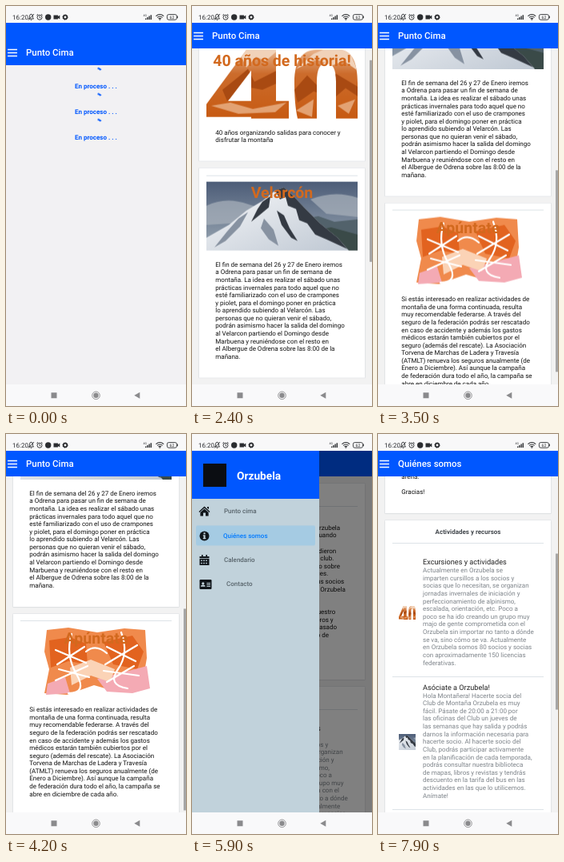
Animation of 225x500 px, one loop 8000 ms. Source, as an HTML page:

```html
<!DOCTYPE html>
<html lang="es">
<head>
<meta charset="utf-8">
<title>Club de montaña</title>
<style>
@property --home { syntax: "<number>"; inherits: true; initial-value: 0; }
@property --about { syntax: "<number>"; inherits: true; initial-value: 0; }

* { box-sizing: border-box; margin: 0; padding: 0; }
html, body { width: 225px; height: 500px; overflow: hidden; }
body { font: 8px/9.58px Roboto, sans-serif; text-rendering: geometricPrecision; }
svg { display: block; }
.stage, .stage div, .stage .abs { position: absolute; }
.stage {
  width: 225px; height: 500px; overflow: hidden; background: #f2f1f3;
  animation: home 8s linear infinite, about 8s linear infinite;
}
.stage, .stage * { animation-iteration-count: infinite; }

/* System bars */
.status { left: 0; top: 0; width: 225px; height: 21px; background: #f8f8f9; }
.nav { left: 0; top: 473px; width: 225px; height: 27px; background: #f9f9fa; }

/* App header */
.header {
  left: 0; top: 21px; width: 225px; height: 32px; background: #0057ff; color: #fff;
  animation: header 8s step-end infinite;
}
.bar { left: 0; bottom: 0; width: 225px; height: 32px; }
.bar svg { position: absolute; left: 2px; top: 11px; }
.bar b { position: absolute; left: 25px; top: 9px; font: 500 11.46px/14px Roboto, sans-serif; white-space: pre; }

/* Pages */
.view { left: 0; top: 53px; width: 225px; height: 420px; overflow: hidden; background: #f2f2f2; }
.list { left: 0; top: 0; width: 225px; display: flow-root; }
#home { animation: first 8s step-end infinite; }
#home .list { transform: translateY(calc(var(--home) * -1px)); }
#about { visibility: hidden; }
#about, .second { animation: second 8s step-end infinite; }
.first { animation: first 8s step-end infinite; }
#about .list { transform: translateY(calc(var(--about) * -1px)); }
.thumb { left: 222px; top: 0; width: 2.5px; background: #a6a6a6; animation: thumb 8s linear infinite; }
#home .thumb { height: 252px; transform: translateY(calc(var(--home) * .606px)); }
#about .thumb { height: 195px; transform: translateY(calc(var(--about) * .464px)); }

.card {
  position: relative; margin: 9px 9px 0; padding: 8.5px 9px 21.3px; background: #fff;
  box-shadow: 0 0 0 .6px #dfe3e7, 0 .8px 1.5px #0003;
}
hr { border: 0; height: .7px; background: #dde3e8; }
.card p { margin: 12.7px 0 0 11.3px; white-space: pre; color: #111; }
.stage .pic { position: relative; height: 86px; margin-top: 7.8px; }
.pic svg { animation: load 8s linear infinite; }
h2 {
  position: absolute; left: 0; top: 2px; width: 100%; text-align: center; white-space: nowrap;
  font: 700 19.5px/24px Roboto, sans-serif; color: #d2691e;
}
h3 { font: 700 8px/13px Roboto, sans-serif; text-align: center; color: #43484d; margin-bottom: 6.5px; }
#about p { margin-top: 22.2px; }
#about .card + .card { height: 640px; }
.item { left: 47px; white-space: pre; color: #7d8389; line-height: 9.63px; }
.item b { display: block; font: 400 9.17px/11px Roboto, sans-serif; color: #222; }

/* Loading */
.loading { left: 0; top: 74px; width: 225px; height: 399px; background: #f2f1f3; color: #0057ff; animation: loading 8s step-end infinite; }
.wait { left: 0; width: 225px; height: 32px; text-align: center; font-weight: 700; padding-top: 22px; }
.wait svg { position: absolute; left: 102.5px; top: 1px; animation: spin 1.33333s linear infinite; }
.wait circle { animation: arc 1.33333s ease-in-out infinite; }

/* Drawer */
.shade { left: 0; top: 21px; width: 225px; height: 452px; background: #000; opacity: 0; animation: shade 8s linear infinite; }
.drawer {
  left: 0; top: 21px; width: 159px; height: 452px; background: #c1d2db;
  transform: translateX(-160px); animation: drawer 8s linear infinite;
}
.brand { width: 159px; height: 60px; background: #0057ff; }
.brand i { position: absolute; left: 14px; top: 16px; width: 29px; height: 29px; background: #0b0d12; }
.brand b { position: absolute; left: 56px; top: 23px; font: 700 13.7px/18px Roboto, sans-serif; color: #fff; }
.active { left: 5px; top: 63px; width: 149px; height: 25px; border-radius: 2px; background: #a5cbe3; animation: pick 8s step-end infinite; }
.entry { height: 10px; font-weight: 500; color: #58646b; }
.entry:nth-of-type(3) { animation: off 8s step-end infinite; }
.entry:nth-of-type(4) { animation: on 8s step-end infinite; }

@keyframes home {
  0%, 26.25% { --home: 0; } 27.5% { --home: 4; } 30% { --home: 24; } 32.5% { --home: 98; }
  35%, 36.25% { --home: 156; } 37.5% { --home: 161; } 38.75% { --home: 177; }
  42.5% { --home: 243; } 46.25% { --home: 268; } 48.75%, 100% { --home: 273; }
}
@keyframes about {
  0%, 87.5% { --about: 0; } 88.75% { --about: 7; } 91.25% { --about: 58; } 93.75% { --about: 124; }
  96.25% { --about: 177; } 98.75%, 100% { --about: 208; }
}
@keyframes header { 0% { height: 53px; } 6.25%, 100% { height: 32px; } }
@keyframes loading { 0% { visibility: visible; } 6.25%, 100% { visibility: hidden; } }
@keyframes load { 0%, 8% { opacity: 0; } 12%, 100% { opacity: 1; } }
@keyframes first { 0% { visibility: visible; } 73.75%, 100% { visibility: hidden; } }
@keyframes second { 0% { visibility: hidden; } 73.75%, 100% { visibility: visible; } }
@keyframes thumb { 0%, 26.25% { opacity: 0; } 27.5%, 54% { opacity: 1; } 58%, 87.5% { opacity: 0; } 88.5%, 100% { opacity: 1; } }
@keyframes shade { 0%, 55% { opacity: 0; } 60%, 73.75% { opacity: .5; } 80%, 100% { opacity: 0; } }
@keyframes drawer {
  0% { transform: translateX(-160px); }
  55% { transform: translateX(-160px); animation-timing-function: ease-out; }
  60% { transform: none; }
  73.75% { transform: none; animation-timing-function: ease-in-out; }
  80%, 100% { transform: translateX(-160px); }
}
@keyframes pick { 0% { transform: none; } 72.5%, 100% { transform: translateY(30.4px); } }
@keyframes off { 0% { color: #007aff; } 72.5%, 100% { color: #58646b; } }
@keyframes on { 0% { color: #58646b; } 72.5%, 100% { color: #007aff; } }
@keyframes spin { from { transform: rotate(-78deg); } to { transform: rotate(282deg); } }
@keyframes arc { 0%, 100% { stroke-dasharray: 4.6 60; } 50% { stroke-dasharray: 32 60; } }
</style>
</head>
<body>
<svg width="0" height="0" style="position:absolute">
  <defs>
    <clipPath id="digits">
      <path clip-rule="evenodd" d="M50 0H87V64H103V86H56V84H0V68ZM56 26L27 64H56ZM110 40C110 14 120 0 137 0H166C182 0 189 16 189 42V86H162V40C162 24 158 17 150 17S138 24 138 40V86H114C111 72 110 58 110 40Z"/>
    </clipPath>
    <linearGradient id="amber" x2="0" y2="1">
      <stop stop-color="#e9b48c"/><stop offset=".35" stop-color="#cc6c2c"/><stop offset="1" stop-color="#c75a12"/>
    </linearGradient>
    <linearGradient id="sky" x2="0" y2="1">
      <stop stop-color="#4d5d78"/><stop offset="1" stop-color="#9ba8b4"/>
    </linearGradient>
    <linearGradient id="snow" x2="1" y2="1">
      <stop stop-color="#f7f8fa"/><stop offset="1" stop-color="#bfc8d3"/>
    </linearGradient>
  </defs>
  <symbol id="forty" viewBox="0 0 189 86" preserveAspectRatio="none">
    <g clip-path="url(#digits)">
      <path fill="url(#amber)" d="M0 0H189V86H0Z"/>
      <path fill="#f1d2b9" d="M40 0H90L74 14L62 9L50 22ZM112 24L134 5L146 0H178L189 26L172 14L156 20L138 12Z"/>
      <path fill="#a94a12" d="M20 50L40 34L52 24L60 40L88 26V42L70 50L48 46L26 64ZM110 50L126 32L140 46L162 30L189 46V58L174 48L160 60L134 52L114 66Z"/>
      <path fill="#e3a273" d="M6 70L30 66L58 74L100 66L86 78L40 80ZM112 76L134 62L132 84ZM164 70L186 62L178 80Z"/>
    </g>
  </symbol>
  <symbol id="peak" viewBox="0 0 189 86">
    <path fill="url(#sky)" d="M0 0H189V86H0Z"/>
    <path fill="#aab3bd" d="M0 30Q24 18 52 28T104 26L60 50L0 54ZM130 22Q160 10 189 20V44L150 40Z" opacity=".7"/>
    <path fill="#52626b" d="M110 48L140 43L160 50L189 47V86H100Z"/>
    <path fill="#3a4a48" d="M128 62L156 57L189 66V86H120Z"/>
    <path fill="url(#snow)" d="M0 70L28 54L50 36L70 24L86 11L97 7L108 17L122 32L142 52L164 70L178 86H0Z"/>
    <path fill="#343a43" d="M86 11L97 7L108 17L122 32L142 52L164 70L176 84L150 72L136 66L126 52L116 48L112 34L102 30L99 19L92 22ZM70 25L80 18L78 32L66 42L56 50L64 34ZM88 36L97 42L104 58L114 74L106 70L94 54Z"/>
    <path fill="#8792a1" d="M40 46L52 38L42 56L24 74L10 82L26 62ZM72 46L84 60L90 80L78 72L68 58Z"/>
  </symbol>
  <symbol id="boots" viewBox="0 0 189 86">
    <path fill="#f08a4c" d="M33 3L60 0L96 6L130 1L156 3L158 38L152 74L120 80L92 72L58 84L30 82L36 52L30 30Z"/>
    <path fill="#e2631f" d="M36 16L62 12L82 20L84 46L60 42L38 50ZM104 18L140 10L154 30L146 52L116 46Z"/>
    <path fill="#f4aab4" d="M96 64L128 56L158 48L162 76L140 82L108 80ZM34 70L56 62L62 82L32 84Z"/>
    <path fill="#fbd3b6" d="M62 50L88 40L118 52L112 68L88 60L64 72Z"/>
    <path fill="none" stroke="#fff" stroke-width="2.2" stroke-linecap="round" d="M44 28L82 44M80 24L46 46M48 52L86 62M84 48L44 66M108 24L144 42M146 22L106 46M104 54L148 60M142 48L108 68M64 8Q56 34 70 58T60 82M126 6Q136 32 122 52T134 76M82 30Q94 20 108 32"/>
  </symbol>
  <symbol id="ring" viewBox="0 0 20 20">
    <circle cx="10" cy="10" r="7.5" fill="none" stroke="#0057ff" stroke-width="2"/>
  </symbol>
</svg>

<div class="stage">
  <div class="view" id="home">
    <div class="list">
      <article class="card"><hr>
        <div class="pic"><svg width="189" height="86"><use href="#forty"/></svg><h2>40 años de historia!</h2></div>
        <p>40 años organizando salidas para conocer y
disfrutar la montaña</p>
      </article>
      <article class="card"><hr>
        <div class="pic"><svg width="189" height="86"><use href="#peak"/></svg><h2>Velarcón</h2></div>
        <p>El fin de semana del 26 y 27 de Enero iremos
a Odrena para pasar un fin de semana de
montaña. La idea es realizar el sábado unas
prácticas invernales para todo aquel que no
esté familiarizado con el uso de crampones
y piolet, para el domingo poner en práctica
lo aprendido subiendo al Velarcón. Las
personas que no quieran venir el sábado,
podrán asimismo hacer la salida del domingo
al Velarcon partiendo el Domingo desde
Marbuena y reuniéndose con el resto en
el Albergue de Odrena sobre las 8:00 de la
mañana.</p>
      </article>
      <article class="card"><hr>
        <div class="pic"><svg width="189" height="86"><use href="#boots"/></svg><h2>Apúntate</h2></div>
        <p>Si estás interesado en realizar actividades de
montaña de una forma continuada, resulta
muy recomendable federarse. A través del
seguro de la federación podrás ser rescatado
en caso de accidente y además los gastos
médicos estarán también cubiertos por el
seguro (además del rescate). La Asociación
Torvena de Marchas de Ladera y Travesía
(ATMLT) renueva los seguros anualmente (de
Enero a Diciembre). Así aunque la campaña
de federación dura todo el año, la campaña se
abre en diciembre de cada año.</p>
      </article>
    </div>
    <div class="thumb"></div>
  </div>

  <div class="view" id="about">
    <div class="list">
      <article class="card"><h3>Un poquito de historia</h3><hr>
        <p>El nacimiento del club de montaña Orzubela
se remonta a la primavera de 1976 cuando
jóvenes aficionados a la montaña y
pertenecientes a un club juvenil decidieron
crear la sección montañera de dicho club.
Fueron unos comienzos duros debido sobre
todo a la situación política de entonces.
Gracias al esfuerzo económico de sus socios
y socias se logró alquilar una bajera. Orzubela
ya tenía su sede social.

Desde aquí queremos hacer llegar nuestro
agradecimiento a todos los montañeros y
montañeras que alguna vez habéis pasado
por el club aportando vuestro granito de
arena.

Gracias!</p>
      </article>
      <article class="card"><h3>Actividades y recursos</h3><hr>
        <svg class="abs" style="left:17px;top:107px" width="21" height="17"><use href="#forty"/></svg>
        <div class="item" style="top:47.5px"><b>Excursiones y actividades</b>Actualmente en Orzubela se
imparten cursillos a los socios y
socias que lo necesitan, se organizan
jornadas invernales de iniciación y
perfeccionamiento de alpinismo,
escalada, orientación, etc. Poco a
poco se ha ido creando un grupo muy
majo de gente comprometida con el
Orzubela sin importar no tanto a dónde
se va, sino cómo se va. Actualmente
en Orzubela somos 80 socios y socias
con aproximadamente 150 licencias
federativas.</div>
        <hr class="abs" style="left:9px;top:195px;width:189px">
        <svg class="abs" style="left:17px;top:267px" width="21" height="20" viewBox="52 0 90 86" preserveAspectRatio="none"><use href="#peak" width="189" height="86"/></svg>
        <div class="item" style="top:204px"><b>Asóciate a Orzubela!</b>Hola Montañera! Hacerte socia del
Club de Montaña Orzubela es muy
fácil. Pásate de 20:00 a 21:00 por
las oficinas del Club un jueves de
las semanas que hay salida y podrás
darnos la información necesaria para
hacerte socio. Al hacerte socio del
Club, podrás participar activamente
en la planificación de cada temporada,
podrás consultar nuestra biblioteca
de mapas, libros y revistas y tendrás
descuento en la tarifa del bus en las
actividades en las que lo utilicemos.
Anímate!</div>
        <hr class="abs" style="left:9px;top:361px;width:189px">
      </article>
    </div>
    <div class="thumb"></div>
  </div>

  <div class="loading">
    <div class="wait" style="top:0"><svg width="20" height="20"><circle cx="10" cy="10" r="7.5" fill="none" stroke="#0057ff" stroke-width="2"/></svg>En proceso . . .</div>
    <div class="wait" style="top:31.8px"><svg width="20" height="20"><circle cx="10" cy="10" r="7.5" fill="none" stroke="#0057ff" stroke-width="2"/></svg>En proceso . . .</div>
    <div class="wait" style="top:63.6px"><svg width="20" height="20"><circle cx="10" cy="10" r="7.5" fill="none" stroke="#0057ff" stroke-width="2"/></svg>En proceso . . .</div>
  </div>

  <div class="header">
    <div class="bar">
      <svg width="12" height="11"><path stroke="#fff" stroke-width="1.4" d="M0 1.5H12M0 5.5H12M0 9.5H12"/></svg>
      <b class="first">Punto Cima</b><b class="second">Quiénes somos</b>
    </div>
  </div>

  <div class="shade"></div>
  <nav class="drawer abs">
    <div class="brand"><i></i><b>Orzubela</b></div>
    <div class="active"></div>
    <div class="entry" style="left:40px;top:71px">Punto cima</div>
    <div class="entry" style="left:39px;top:101.5px">Quiénes somos</div>
    <div class="entry" style="left:40px;top:132px">Calendario</div>
    <div class="entry" style="left:43px;top:162px">Contacto</div>
    <svg class="abs" style="left:8px;top:68px" width="20" height="110" fill="#10151a">
      <path d="M7.5 1.5L14.5 8L13.6 9L7.5 3.6L1.4 9L.5 8ZM11 2H13V5L11 3.4ZM7.5 4.6L12.6 9V13.5H9V9.6H6V13.5H2.4V9Z"/>
      <circle cx="7.5" cy="38.5" r="6"/>
      <path fill="#c1d2db" d="M6.5 34.2H8.6V36.2H6.5ZM5.8 37.2H8.6V41H9.3V42.2H5.8V41H6.5V38.4H5.8Z"/>
      <path d="M1.5 64H4V62H5.6V64H9.4V62H11V64H13.5V66.2H1.5ZM1.5 67H13.5V75H1.5Z"/>
      <path stroke="#c1d2db" stroke-width="1.4" stroke-dasharray="1.6 1.4" d="M3.2 69.3H12M3.2 72.5H12"/>
      <rect x="1.5" y="93" width="15" height="12" rx="1.2"/>
      <path fill="#c1d2db" d="M3 101.8Q3 99.6 5.8 99.6T8.6 101.8ZM10.4 97H15V98H10.4ZM10.4 99H15V100H10.4ZM10.4 101H15V102H10.4Z"/>
      <circle cx="5.8" cy="97.8" r="1.6" fill="#c1d2db"/>
    </svg>
  </nav>

  <div class="status">
    <svg width="225" height="21" fill="#2b2d30">
      <text x="8" y="16.8" font-size="8" font-family="Roboto, sans-serif">16:20</text>
      <path fill="none" stroke="#2b2d30" stroke-width=".9" d="M28.5 16H34.5L33.5 14.5V12.5Q33.5 10.3 31.5 10.3T29.5 12.5V14.5ZM28 17.5L35 10M30.8 17.4H32.2"/>
      <g fill="none" stroke="#2b2d30" stroke-width=".9"><circle cx="42" cy="14.2" r="3"/><path d="M42 12.4V14.4L43.3 15M38.4 11.6L40 10.2M45.6 11.6L44 10.2"/></g>
      <circle cx="52.7" cy="14" r="3.7"/>
      <path d="M59.5 11.4H65V13L67.3 11.6V16.4L65 15V16.6H59.5Z"/>
      <circle cx="74" cy="14" r="2.3" fill="none" stroke="#2b2d30" stroke-width="1.7"/>
      <circle cx="74" cy="14" r="3.1" fill="none" stroke="#2b2d30" stroke-width="1" stroke-dasharray="1.2 1.23"/>
      <text x="171.5" y="13" font-size="3.6" font-family="Roboto, sans-serif">4G</text>
      <path d="M174 15.4H175.4V17H174ZM176.2 14H177.6V17H176.2ZM178.4 12.6H179.8V17H178.4ZM180.6 11.2H182V17H180.6Z"/>
      <path fill="none" stroke="#2b2d30" stroke-width="1.2" d="M187.4 12.6Q192.3 8.4 197.2 12.6M189 14.4Q192.3 11.6 195.6 14.4M190.6 16Q192.3 14.7 194 16"/>
      <circle cx="192.3" cy="17" r=".8"/>
      <rect x="201.4" y="10.6" width="12" height="6.6" rx="2" fill="none" stroke="#2b2d30" stroke-width=".9"/>
      <path d="M214.2 12.6H215V15.2H214.2Z"/>
      <text x="207.4" y="15.8" font-size="5" text-anchor="middle" font-family="Roboto, sans-serif">62</text>
    </svg>
  </div>
  <div class="nav">
    <svg width="225" height="27" fill="#8b8b8d">
      <path d="M56.5 10.3H63.5V17.3H56.5ZM160.3 13.8L167.3 9.8V17.8Z"/>
      <circle cx="112.5" cy="13.8" r="3.2"/>
      <circle cx="112.5" cy="13.8" r="4.8" fill="none" stroke="#8b8b8d" stroke-width=".9"/>
    </svg>
  </div>
</div>
</body>
</html>
```
